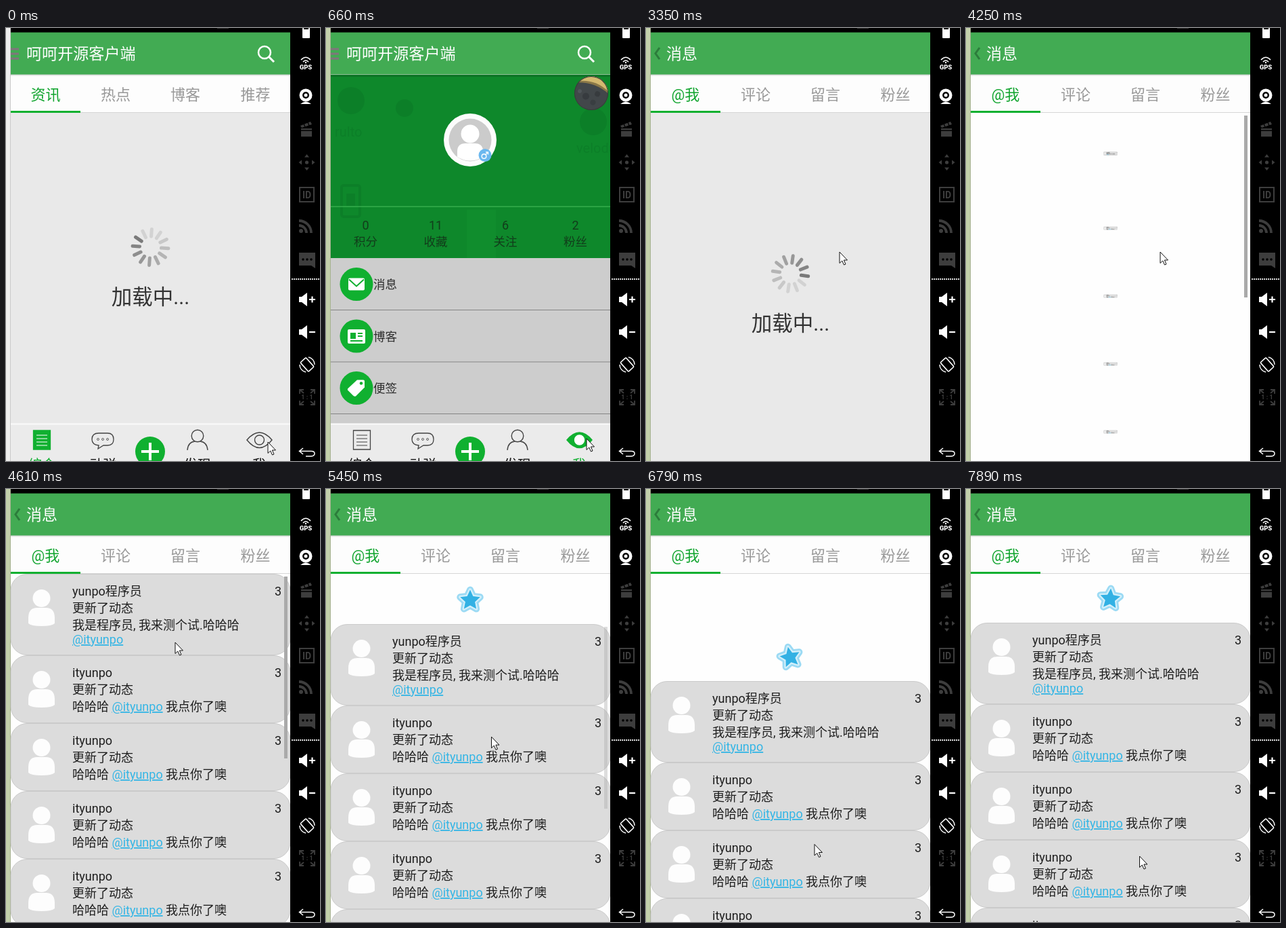
An HTML page that plays this animation: 464 px wide and 638 px high, repeating every 8000 ms.

```html
<!DOCTYPE html>
<html lang="zh">
<head>
<meta charset="utf-8">
<style>
html, body { margin: 0; width: 100%; height: 100%; overflow: hidden; background: #000; }
svg { display: block; width: 464px; height: 638px; }
text { font-family: Roboto, "Noto Sans CJK SC", "Noto Sans CJK", sans-serif; white-space: pre; }
</style>
</head>
<body>
<svg id="stage" viewBox="0 0 464 638"></svg>
<script>
const LOOP = 8000;
const GREEN = '#10b030';
const stage = document.getElementById('stage');

const rect = (x, y, w, h, fill, extra = '') => `<rect x="${x}" y="${y}" width="${w}" height="${h}" fill="${fill}" ${extra}/>`;
const circle = (x, y, r, fill, extra = '') => `<circle cx="${x}" cy="${y}" r="${r}" fill="${fill}" ${extra}/>`;
const fillPath = (d, fill, extra = '') => `<path d="${d}" fill="${fill}" ${extra}/>`;
const line = (d, color, w = 1.5, extra = '') => `<path d="${d}" fill="none" stroke="${color}" stroke-width="${w}" ${extra}/>`;
const text = (x, y, size, fill, s, anchor = 'start', extra = '') =>
  `<text x="${x}" y="${y}" font-size="${size}" fill="${fill}" text-anchor="${anchor}" ${extra}>${s}</text>`;
const group = (id, body, extra = '') => `<g id="${id}" ${extra}>${body}</g>`;
const COLS = [58.5, 162, 265, 368.5];

function tabs(labels) {
  return rect(7, 69, 413, 56, '#fdfdfd') + rect(7, 69, 413, 1, '#dfe3e0') + rect(7, 70, 413, 1, '#f1f2f1')
    + rect(7, 124, 413, 1, '#d6d6d6') + rect(7, 122, 103, 3, GREEN)
    + labels.map((s, i) => text(COLS[i], 105.5, 22, i ? '#999' : '#12a52f', s, 'middle')).join('');
}

function spinner(id) {
  let s = '';
  for (let i = 0; i < 12; i++) {
    const shade = Math.round(122 + 88 * Math.min(1, i / 9));
    s += line('M16 0H26.5', `rgb(${shade},${shade},${shade})`, 5, `stroke-linecap="round" transform="rotate(${-30 * i})"`);
  }
  return group(id, s);
}

const loading = (id, y) => rect(7, 125, 413, 513, '#e9e9e9') + spinner(id)
  + text(213.5, y + 84, 30.5, '#333', '加载中...', 'middle');

function homePage() {
  return loading('spinHome', 323) + tabs(['资讯', '热点', '博客', '推荐']);
}

function mePage() {
  const faint = '#0b7a27';
  let s = rect(7, 69, 413, 270, '#0e882b') + rect(7, 69, 413, 3, '#0b7425');
  s += `<g opacity=".6">` + circle(37, 107, 20, faint) + circle(116, 118, 13, faint) + circle(395, 138, 20, faint)
    + rect(23, 232, 27, 46, 'none', `rx="3" stroke="${faint}" stroke-width="4"`) + rect(30, 244, 13, 18, faint)
    + rect(208, 268, 43, 71, '#12912f')
    + text(13, 160, 20, faint, 'rulto') + text(370, 184, 20, faint, 'velodu') + '</g>';
  s += circle(213, 165, 39, '#fcfcfc') + circle(213, 165, 31.5, '#cbcbcb')
    + circle(213, 156, 13.5, '#fff') + fillPath('M194 190V182Q194 170 206 170H220Q232 170 232 182V190Q213 201 194 190Z', '#fff')
    + circle(235, 187.5, 9.5, '#6cb8ef') + circle(233.5, 189, 3.3, 'none', 'stroke="#fff" stroke-width="1.4"')
    + line('M236 186.5L239.5 183M236 183H239.5V186.5', '#fff', 1.3);
  const moon = circle(0, 0, 25, '#42474a') + circle(-7, -6, 5, '#373b3f') + circle(-12, 7, 4, '#393e41')
    + circle(2, 9, 4, '#373b3e') + circle(-3, -17, 3, '#50565a')
    + fillPath('M8 -23.7A25 25 0 0 1 8 23.7Q17 0 8 -23.7Z', '#8b7848')
    + fillPath('M11 -22.4A25 25 0 0 1 11 22.4Q21 0 11 -22.4Z', '#d4b970')
    + circle(0, 0, 24.5, 'none', 'stroke="#373d38"');
  s += group('moon', moon) + rect(7, 262.5, 413, 1.3, '#3bb253');
  [['0', '积分'], ['11', '收藏'], ['6', '关注'], ['2', '粉丝']].forEach(([n, label], i) => {
    s += text(COLS[i], 296.5, 18, '#123d1b', n, 'middle') + text(COLS[i], 321, 17.5, '#123d1b', label, 'middle');
  });
  s += rect(7, 339, 413, 245, '#cdcdcd');
  const icons = [
    rect(-12, -9, 24, 18, '#fff', 'rx="2"') + line('M-11 -7L0 3L11 -7', GREEN, 2),
    rect(-13, -10, 26, 21, '#fff', 'rx="2"') + rect(-9, -5, 8, 9, GREEN) + line('M2 -4H9M2 0H9M-9 7H9', GREEN, 2),
    fillPath('M-13 1L1 -12H10Q12 -12 12 -10V-1L-1 12Q-3 13 -5 11L-13 3Z', '#fff') + circle(7, -7, 2.3, GREEN)
  ];
  ['消息', '博客', '便签'].forEach((label, i) => {
    const y = 377.5 + 76.5 * i;
    s += circle(45, y, 24.5, GREEN) + `<g transform="translate(45 ${y})">${icons[i]}</g>`
      + text(70, y + 6.5, 17.5, '#2d2d2d', label) + rect(7, y + 37.5, 413, 1, '#858585');
  });
  return s;
}

function nav() {
  const ink = '#444';
  const doc = 'M40.5 593H65.5V621H40.5Z', eye = 'M356 607Q374.5 585 393 607Q374.5 630 356 607Z';
  const label = (id, x, s) => text(x, 650.5, 20, '#111', s, 'middle', id ? `id="${id}"` : '');
  return rect(7, 583, 413, 55, '#ebebeb') + rect(7, 582.5, 413, 2, '#fbfbfb')
    + `<path id="doc" d="${doc}" stroke-width="1.3"/>` + line('M45 600H61M45 605H61M45 610H61M45 615H61', '', 1.2, 'id="docLines"')
    + line('M137 597H150Q159 597 159 606Q159 615 150 615H144L136 620L137 615Q127 614 127 606Q127 597 137 597Z', ink, 1.3)
    + [136, 143, 150].map(x => circle(x, 606, 1.5, 'none', `stroke="${ink}" stroke-width=".8"`)).join('')
    + circle(283, 601, 8.8, 'none', `stroke="${ink}" stroke-width="1.4"`) + line('M268 622Q269 610 279 609M287 609Q297 610 298 622', ink, 1.4)
    + `<path id="eye" d="${eye}" stroke-width="1.4"/>` + circle(374.5, 607, 7, '', 'id="iris" stroke-width="1.4"')
    + label('labDoc', 53, '综合') + label('', 143.5, '动弹') + label('', 283, '发现') + label('labMe', 374, '我')
    + circle(213, 624, 22, GREEN) + line('M200 624H226M213 611V637', '#fff', 4);
}

// Cards are drawn around their own centre so they can grow in place.
function card(i) {
  const h = i ? 100 : 120;
  const link = `<tspan fill="#33b5e5" text-decoration="underline">@ityunpo</tspan>`;
  const row = (y, s) => text(98, y, 18, '#1e1e1e', s);
  const body = rect(7, .5, 413, h - 1, '#dcdcdc', 'rx="24" stroke="#c2c2c2" stroke-width=".8"')
    + circle(52.5, 36, 13, '#fdfdfd') + fillPath('M33 73V65Q33 50 46 50H59Q72 50 72 65V73Q68 77 52.5 77T33 73Z', '#fdfdfd')
    + row(32, i ? 'ityunpo' : 'yunpo程序员') + row(57, '更新了动态') + text(407, 32, 18, '#1e1e1e', '3', 'end')
    + (i ? row(82, `哈哈哈 ${link} 我点你了噢`) : row(82, '我是程序员, 我来测个试.哈哈哈') + row(103, link));
  return `<g class="card"><g transform="translate(-213.5 ${-h / 2})">${body}</g></g>`;
}

function star(r) {
  let d = '';
  for (let k = 0; k < 10; k++) {
    const a = (k * 36 - 90) * Math.PI / 180, q = k % 2 ? r * .48 : r;
    d += (k ? 'L' : 'M') + (q * Math.cos(a)).toFixed(2) + ' ' + (q * Math.sin(a)).toFixed(2);
  }
  return d + 'Z';
}

function messagePage() {
  const list = rect(7, 125, 413, 513, '#fefefe')
    + group('star', line(star(15.5), '#9bdaf4', 10, 'stroke-linejoin="round"') + line(star(15.5), '#d3f0fb', 4.5, 'stroke-linejoin="round"')
      + fillPath(star(15.5), '#32b1e4'))
    + group('cards', [0, 1, 2, 3, 4, 5].map(card).join('') + rect(411, 129, 5, 268, '#aaa', 'id="bar"'));
  return group('wait', loading('spinMsg', 362)) + group('list', list) + tabs(['@我', '评论', '留言', '粉丝']);
}

function topBar() {
  return rect(7, 0, 413, 6.5, '#000') + rect(312, 0, 17, 1, '#333') + rect(7, 6.5, 413, 61.5, '#42ab53')
    + rect(7, 68, 413, 1, '#8fbf98')
    + group('homeBar', line('M7 31H19M7 38H19M7 45H19', '#80757c', 3) + text(30, 45.5, 23.1, '#fff', '呵呵开源客户端')
      + circle(382, 36, 9, 'none', 'stroke="#fff" stroke-width="2.5"') + line('M388.5 42.5L396 50', '#fff', 3))
    + group('msgBar', line('M20 29L14 37.5L20 46', '#2c7c3b', 3) + text(30, 45.5, 23, '#fff', '消息'));
}

function sidebar() {
  const W = '#fff', D = '#3d3d3d';
  const speaker = y => fillPath(`M433 ${y - 4}H437L445 ${y - 10}V${y + 10}L437 ${y + 4}H433Z`, W);
  const arrow = a => `<path d="M-3.5 -7.5L0 -12L3.5 -7.5Z" fill="${D}" transform="translate(444.5 198) rotate(${a})"/>`;
  return rect(420, 0, 44, 638, '#000') + rect(438, 0, 11, 15, W, 'rx="1"') + rect(440, 0, 7, 2, '#000')
    + line('M436 47Q443 39.5 450 47M439 50Q443 45.5 447 50', W, 1.7) + circle(443, 51, 1.2, W)
    + text(443, 61, 9.5, W, 'GPS', 'middle', 'font-weight="900"')
    + circle(443, 99, 9.5, W) + circle(443, 99, 5, '#000') + circle(443, 99, 2.5, W) + fillPath('M435 112Q443 105 451 112Z', W)
    + rect(436, 148, 16, 12, D) + fillPath('M435 144L450 138L452 142L437 147Z', D) + line('M440 141L442 146M446 139L448 144M436 151H452', '#000', 1.3)
    + circle(444.5, 198, 2.6, D) + [0, 90, 180, 270].map(arrow).join('')
    + rect(434, 235, 21, 21, 'none', `stroke="${D}" stroke-width="2"`) + text(444.5, 251, 14, D, 'ID', 'middle', 'font-weight="700"')
    + circle(436, 299, 3, D) + line('M433 291A11 11 0 0 1 444 302M433 284A18 18 0 0 1 451 302', D, 3.8)
    + fillPath('M433 331H457V354L451 350H433Z', D) + [439, 445, 451].map(x => circle(x, 341, 1.8, '#000')).join('')
    + line('M422 370H464', '#ddd', 2, 'stroke-dasharray="2 1"')
    + speaker(400) + line('M448 400H457M452.5 395.5V404.5', W, 2.2) + speaker(448) + line('M448 448H457', W, 2.2)
    + `<g transform="translate(445 496) rotate(-42)">${rect(-5.5, -9, 11, 18, 'none', 'rx="1.5" stroke="#fff" stroke-width="1.6"')}</g>`
    + line('M434 496A11 11 0 0 0 443 507M456 496A11 11 0 0 0 447 485', W, 1.4)
    + line('M434 539V533H440M434 533L440 538M456 539V533H450M456 533L450 538M434 549V555H440M434 555L440 550M456 549V555H450M456 555L450 550', D, 1.8)
    + text(445, 547, 9, D, '1 : 1', 'middle', 'font-weight="700"')
    + line('M439 619L433.5 623.5L439 628M434 623.5H451Q456 623.5 456 627T451 631H443', W, 1.5);
}

stage.innerHTML = rect(0, 0, 7, 638, '#eee', 'id="edge"') + rect(6, 0, 1, 638, '#000', 'opacity=".15"')
  + group('home', homePage()) + group('me', mePage()) + group('nav', nav()) + group('msg', messagePage())
  + topBar() + sidebar()
  + group('cursor', fillPath('M0 0V16.5L3.8 13L6.5 19L9 18L6.4 12H11.5Z', '#fff', 'stroke="#111" stroke-width="1"'));

const el = id => document.getElementById(id);
const show = (id, on) => el(id).setAttribute('display', on ? 'inline' : 'none');
const move = (id, x, y, r = 0) => el(id).setAttribute('transform', `translate(${x} ${y}) rotate(${r})`);
const paint = (id, fill, stroke) => { el(id).setAttribute('fill', fill); el(id).setAttribute('stroke', stroke); };
const cards = [...document.querySelectorAll('.card')];

// Linear interpolation through [time, ...values] keys.
function track(t, keys) {
  if (t <= keys[0][0]) return keys[0].slice(1);
  for (let i = 1; i < keys.length; i++) {
    const a = keys[i - 1], b = keys[i];
    if (t <= b[0]) return a.slice(1).map((v, k) => v + (b[k + 1] - v) * (t - a[0]) / (b[0] - a[0]));
  }
  return keys[keys.length - 1].slice(1);
}

// The screen refreshes in bursts: [first, last, count].
const BURSTS = [[120, 660, 5], [930, 1710, 7], [1990, 2410, 4], [2680, 3620, 8],
  [3770, 4610, 8], [4910, 5870, 8], [5990, 6940, 8], [7090, 7890, 7]];
function hold(t) {
  let at = 0;
  for (const [a, b, n] of BURSTS) {
    const gap = (b - a) / (n - 1);
    if (t >= a - 1) at = a + gap * Math.min(n - 1, Math.floor((t - a + 15) / gap));
  }
  return at;
}

const CURSOR = [[120, 387, 610], [660, 385, 605], [930, 372, 580], [1450, 212, 340], [1710, 239, 257],
  [1990, 205, 305], [2130, 175, 342], [2270, 154, 360], [2410, 133, 362], [2680, 133, 362], [3351, 286, 330],
  [4250, 287, 330], [4610, 250, 226], [4910, 240, 240], [5458, 244.5, 365], [5870, 246, 464],
  [6804, 249, 523.5], [6940, 250, 535], [7890, 256.5, 541]];
const PULL = [[4780, 0], [4910, 7], [5458, 74], [5870, 126], [6804, 158], [6940, 163], [7090, 130], [7230, 92], [7370, 72]];
const SPIN = [[4910, -48], [5458, 0], [6804, 60], [6940, 64], [7890, 364]];

function draw(time) {
  const t = hold(time);
  const isHome = t < 250, isMsg = t > 2800, isList = t > 4200;
  show('home', isHome);
  show('homeBar', !isMsg);
  show('me', !isHome && !isMsg);
  show('nav', !isMsg);
  show('msg', isMsg);
  show('msgBar', isMsg);
  show('wait', !isList);
  show('list', isList);
  el('edge').setAttribute('fill', isHome ? '#eee' : '#c3d0ab');

  paint('doc', isHome ? GREEN : 'none', isHome ? GREEN : '#444');
  el('docLines').setAttribute('stroke', isHome ? '#fff' : '#444');
  paint('eye', isHome ? 'none' : GREEN, isHome ? '#444' : GREEN);
  paint('iris', isHome ? 'none' : '#fff', isHome ? '#444' : '#fff');
  el('labDoc').setAttribute('fill', isHome ? GREEN : '#111');
  el('labMe').setAttribute('fill', isHome ? '#111' : GREEN);

  move('spinHome', 213.5, 323, 214 + t * .3);
  move('spinMsg', 213.5, 362, 8 + (t - 3351) * .3);
  move('moon', 392, 96, track(t, [[930, -70], [1710, 0]])[0]);

  const [pull] = track(t, PULL), [grow] = track(t, [[4250, .05], [4610, 1]]);
  move('cards', 0, pull);
  cards.forEach((c, i) => c.setAttribute('transform', `translate(213.5 ${i ? 195 + 100 * i : 185}) scale(${grow})`));
  move('star', 213, 90 + pull, track(t, SPIN)[0]);
  el('bar').setAttribute('opacity', track(t, [[5300, 1], [5458, .4], [5600, 0]])[0]);
  move('cursor', ...track(t, CURSOR));
}

function tick() {
  draw(performance.now() % LOOP);
  requestAnimationFrame(tick);
}
tick();
</script>
</body>
</html>
```
